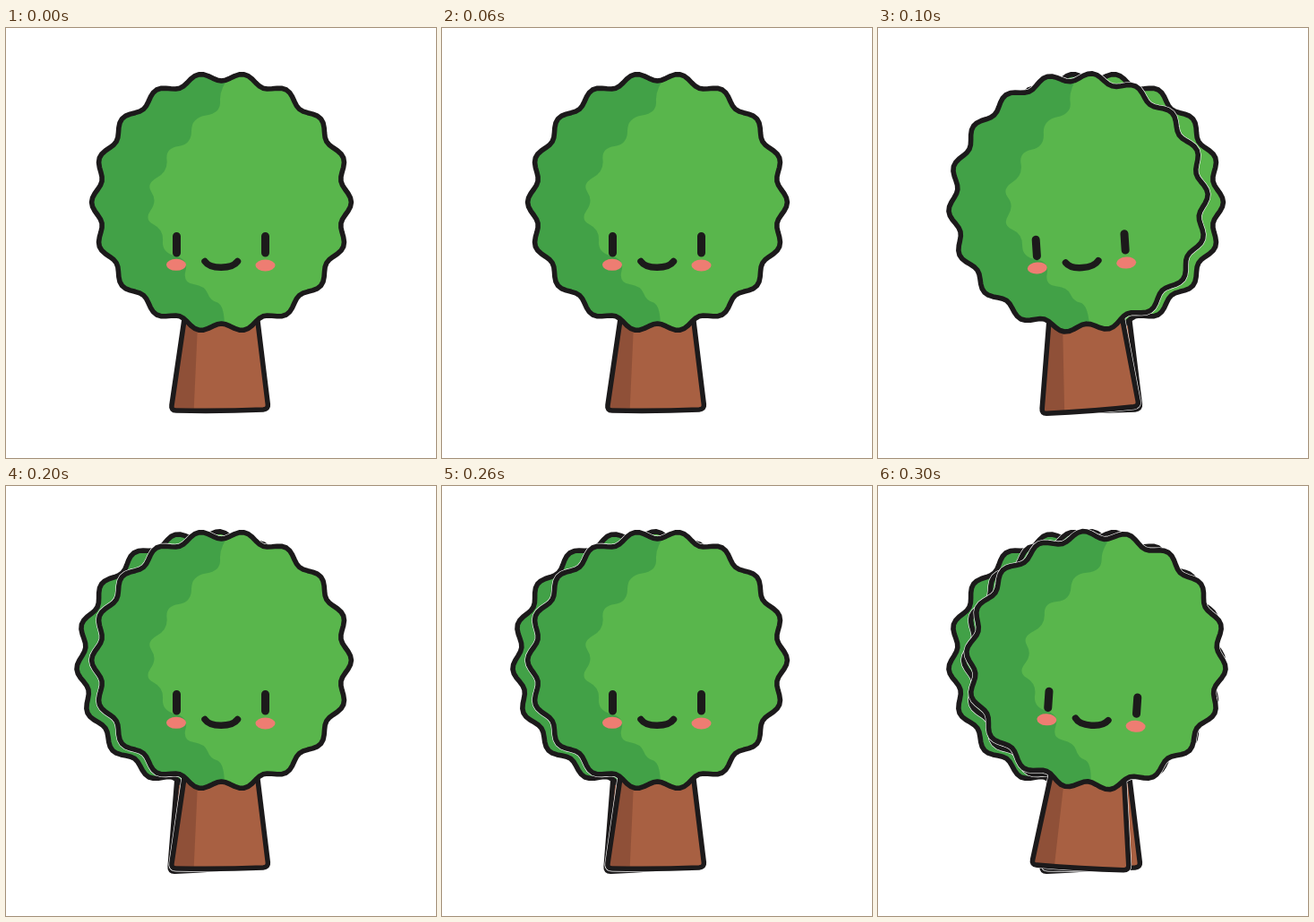
An HTML page for the animation above (0.4 s loop, 480 by 480 pixels).

```html
<!DOCTYPE html>
<html lang="en">
<head>
<meta charset="utf-8">
<title>Swaying tree</title>
<style>
  html, body { margin: 0; width: 100%; height: 100%; overflow: hidden; background: #fff; }
  svg { display: block; width: 100%; height: 100%; }
</style>
</head>
<body>
<svg viewBox="0 0 480 480">
  <defs>
    <path id="crown"/>
    <path id="trunk" d="M199.500 322 L185 421 Q184 427 190 427 Q240 428 287 426 Q293 425.500 292.300 420 L280.300 322 Z"/>
    <clipPath id="inCrown"><use href="#crown"/></clipPath>
    <clipPath id="inTrunk"><use href="#trunk"/></clipPath>
    <g id="tree" stroke-linecap="round" stroke-linejoin="round">
      <g fill="#fff" stroke="#fff" stroke-width="6.800">
        <use href="#trunk"/><use href="#crown"/>
      </g>
      <use href="#trunk" fill="#a86042"/>
      <path d="M180 320 H214.500 L209.500 430 H180 Z" fill="#8f5038" clip-path="url(#inTrunk)"/>
      <use href="#trunk" fill="none" stroke="#1c1a1b" stroke-width="5.600"/>
      <use href="#crown" fill="#42a147"/>
      <path id="light" fill="#59b64c" clip-path="url(#inCrown)"/>
      <use href="#crown" fill="none" stroke="#1c1a1b" stroke-width="5.600"/>
      <g fill="#ee7d72">
        <ellipse cx="190" cy="264.300" rx="11" ry="6.500"/>
        <ellipse cx="289.500" cy="265" rx="11" ry="6.500"/>
      </g>
      <g fill="none" stroke="#1c1a1b">
        <path d="M190.500 232.500 V251 M289.500 232.500 V251" stroke-width="9"/>
        <path d="M222 260.500 C228 269.500 252 269.500 258.500 260.500" stroke-width="7.500"/>
      </g>
    </g>
  </defs>
  <!-- Each pose is painted over the previous ones until the loop restarts. -->
  <use class="pose" href="#tree"/>
  <use class="pose" href="#tree" transform="rotate(-3.8 239 450)"/>
  <use class="pose" href="#tree"/>
  <use class="pose" href="#tree" transform="rotate(3.9 240 238)"/>
</svg>
<script>
  const STEP = 100;
  const poses = [...document.querySelectorAll('.pose')];

  function crownPath() {
    const points = [];
    for (let deg = 0; deg < 360; deg += 2) {
      const a = deg * Math.PI / 180;
      const r = 140.2 + 4.7 * Math.cos(18 * a);
      points.push(`${(240.5 + r * Math.cos(a)).toFixed(2)} ${(194.5 + r * Math.sin(a)).toFixed(2)}`);
    }
    return `M${points.join('L')}Z`;
  }

  // Smooth curve through the midpoints of a wavy edge, closed on the right.
  function lightPath() {
    const edge = [
      [252, 50], [238, 68], [240, 95], [207, 100], [207, 130], [178, 134],
      [181, 160], [156, 174], [169, 193], [154, 214], [176, 225], [174, 251],
      [204, 258], [197, 284], [222, 288], [228, 304], [242, 308], [245, 340]
    ];
    let d = `M${edge[0]}`;
    for (let i = 1; i < edge.length - 1; i++) {
      const [x, y] = edge[i], [nx, ny] = edge[i + 1];
      d += `Q${x} ${y} ${(x + nx) / 2} ${(y + ny) / 2}`;
    }
    return d + 'L245 345H400V45H252Z';
  }

  document.getElementById('crown').setAttribute('d', crownPath());
  document.getElementById('light').setAttribute('d', lightPath());

  const start = performance.now();
  function draw(now) {
    const step = Math.floor(Math.max(0, now - start) / STEP) % poses.length;
    poses.forEach((pose, i) => pose.setAttribute('visibility', i <= step ? 'visible' : 'hidden'));
    requestAnimationFrame(draw);
  }
  draw(start);
</script>
</body>
</html>
```
